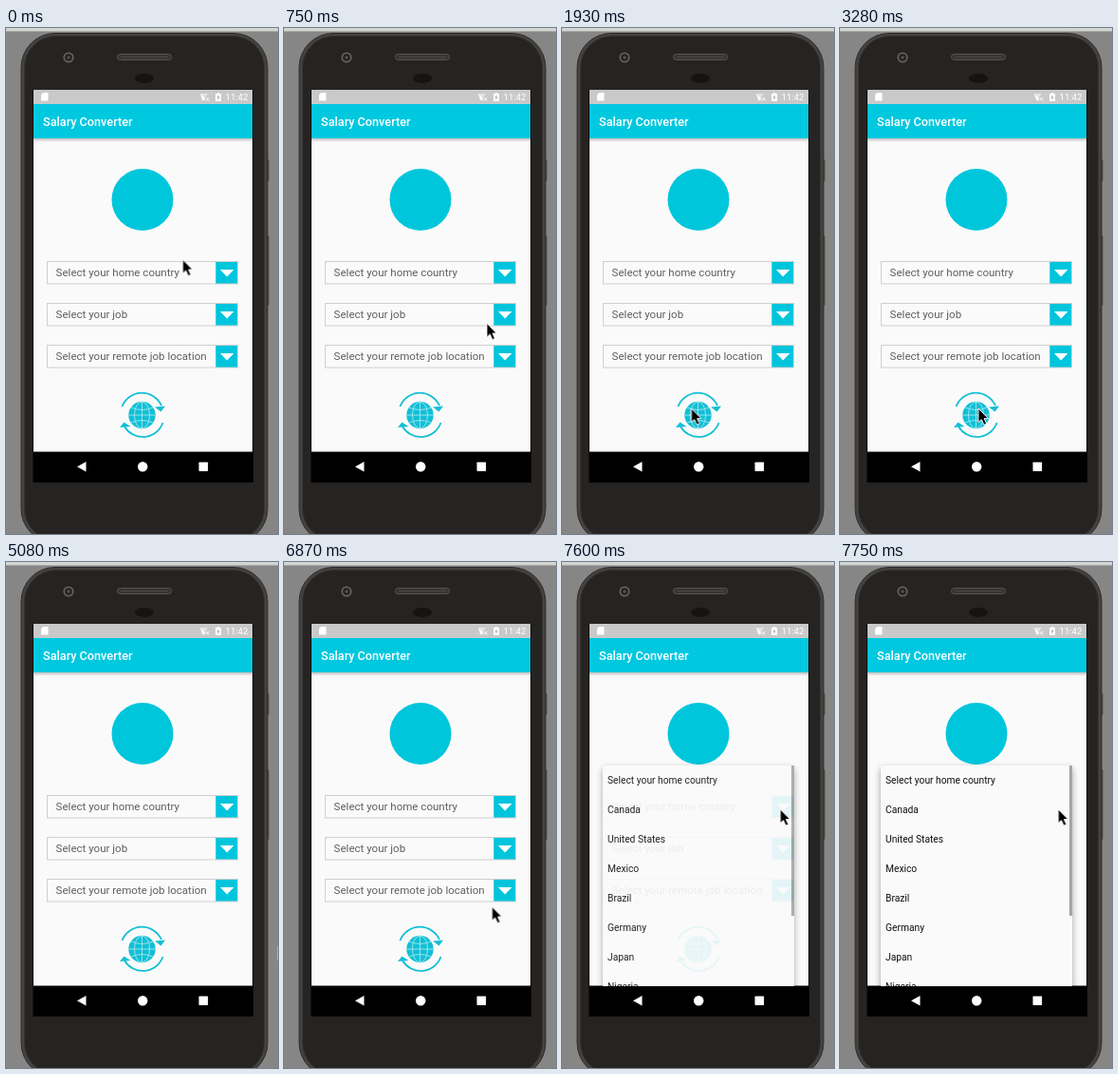
These frames come from a looping animation (287 by 532 pixels, 8000 ms). An HTML page:

```html
<!DOCTYPE html>
<html lang="en">
<head>
<meta charset="utf-8">
<title>Salary Converter</title>
<style>
  html, body { margin: 0; width: 100%; height: 100%; overflow: hidden; background: #868686; }
  svg { position: absolute; left: 0; top: 0; display: block; }
  text, .popup { font-family: Roboto, sans-serif; }
  .hint { font-size: 11.55px; fill: #606060; }
  .screen { position: absolute; left: 29px; top: 66px; width: 231px; height: 379.5px; overflow: hidden; }
  .popup {
    position: absolute; left: 14px; width: 201.5px; top: 148px; height: 250px;
    overflow: hidden; background: #fafafa; opacity: 0;
    box-shadow: 0 3px 7px rgba(0, 0, 0, .36);
    font-size: 10.28px; color: #111;
  }
  .item { height: 31px; line-height: 31.5px; padding-left: 5px; white-space: nowrap; }
  .bar { position: absolute; right: 0; top: 0; width: 2.5px; height: 158px; background: #a6a6a6; }
</style>
</head>
<body>
<svg width="287" height="532" viewBox="0 0 287 532">
  <defs>
    <linearGradient id="drop" x2="0" y2="1">
      <stop stop-color="#000" stop-opacity=".24"/>
      <stop offset="1" stop-color="#000" stop-opacity="0"/>
    </linearGradient>
  </defs>
  <rect width="287" height="3.5" fill="#d2d5d2"/>

  <!-- phone body -->
  <g>
    <rect x="273" y="138" width="4.5" height="23" rx="1.5" fill="#4b4a48"/>
    <rect x="273" y="218" width="4.5" height="74" rx="1.5" fill="#4b4a48"/>
    <rect x="16" y="5.5" width="260" height="536" rx="36" fill="#45423f" stroke="#2e2c2a"/>
    <rect x="19.5" y="8.5" width="253" height="530" rx="33" fill="#262422" stroke="#35322f"/>
    <circle cx="66" cy="31" r="4.7" fill="#22201f" stroke="#64615e" stroke-width="1.8"/>
    <circle cx="66" cy="31" r="1.7" fill="#55524f"/>
    <rect x="117.5" y="27.5" width="57" height="6" rx="3" fill="#35322f" stroke="#595652"/>
    <path d="M121 30.5H171" stroke="#474440" stroke-width="2"/>
    <ellipse cx="146" cy="53" rx="10" ry="5" fill="#151413"/>
    <rect x="28" y="65" width="233" height="413" fill="#111"/>
  </g>

  <!-- app screen -->
  <rect x="29" y="65" width="231" height="381" fill="#fafafa"/>
  <rect x="29" y="65" width="231" height="15" fill="#c9c9c9"/>
  <g fill="#fff">
    <path d="M39 68H44.5V76.5H37V70.3Z"/>
    <path d="M205 69H213L207 77Z" fill-opacity=".5"/>
    <path d="M205 69L210.5 75L208 76.5Z"/>
    <path d="M210.8 73L214.3 76.5M214.3 73L210.8 76.5" stroke="#fff"/>
    <path d="M221 69H223V68H225V69H227V77H221Z"/>
    <path d="M224.6 70L222.4 73.6H223.8L223.4 76L225.6 72.6H224.2Z" fill="#aaa"/>
    <text x="231.5" y="76" font-size="9.6">11:42</text>
  </g>
  <rect x="29" y="116" width="231" height="4" fill="url(#drop)"/>
  <rect x="29" y="80" width="231" height="36" fill="#00c8df"/>
  <text x="39" y="103" font-size="12.7" font-weight="500" fill="#fff">Salary Converter</text>
  <circle cx="144" cy="180.5" r="32.5" fill="#00c6dc"/>
  <g id="fields"></g>

  <!-- convert button -->
  <g fill="none" stroke="#12bfd5" stroke-width="1.8">
    <path d="M122.5 398A22.5 22.5 0 0 1 164 397M165.5 415A22.5 22.5 0 0 1 125 419"/>
    <path d="M157 398.5L168 397.5L163.5 403.5ZM120 420L124.5 414.5L131.5 419Z" fill="#12bfd5" stroke="none"/>
    <circle cx="143.5" cy="407" r="14.2" fill="#12bfd5" stroke="none"/>
    <g stroke="#b5ecf3" stroke-width=".8">
      <ellipse cx="143.5" cy="407" rx="8" ry="14"/>
      <path d="M143.5 393V421M129.5 407H157.5M132 399Q143.5 404 155 399M132 415Q143.5 410 155 415"/>
    </g>
  </g>

  <!-- navigation bar -->
  <rect x="29" y="445.5" width="232" height="32" fill="#000"/>
  <g fill="#fff">
    <path d="M75 461.3L84.5 456V466.6Z"/>
    <circle cx="144.2" cy="461.3" r="5.2"/>
    <rect x="203.5" y="456.5" width="9.6" height="9.6" rx=".8"/>
  </g>
</svg>

<div class="screen"><div class="popup" id="popup"><div id="list"></div><div class="bar"></div></div></div>

<svg width="287" height="532" viewBox="0 0 287 532">
  <path id="cursor" d="M0 0V14.6L3.3 11.6L5.9 17.2L8.6 16L6.1 10.6H10.4Z" fill="#000" stroke="#fff" stroke-width=".9"/>
</svg>

<script>
  const LOOP = 8000;
  const $ = id => document.getElementById(id);

  const field = (label, y) => `
    <rect x="221.3" y="${y}" width="23.7" height="24" fill="#00c5dc"/>
    <rect x="43.5" y="${y + .5}" width="201" height="23.5" fill="none" stroke="#cfcfcf"/>
    <path d="M226 ${y + 9}H240.5L233.2 ${y + 16.5}Z" fill="#fff"/>
    <text class="hint" x="52.6" y="${y + 16}">${label}</text>`;

  $('fields').innerHTML = ['Select your home country', 'Select your job', 'Select your remote job location']
    .map((label, i) => field(label, 245 + 44 * i)).join('');

  $('list').innerHTML = ['Select your home country', 'Canada', 'United States', 'Mexico',
    'Brazil', 'Germany', 'Japan', 'Nigeria'].map(s => `<div class="item">${s}</div>`).join('');

  // Each step holds until the next one: [time, properties]
  const play = (el, steps) => {
    const frames = steps.map(([t, props]) => ({ offset: t / LOOP, easing: 'step-end', ...props }));
    frames.push({ ...frames[frames.length - 1], offset: 1 });
    el.animate(frames, { duration: LOOP, iterations: Infinity }).startTime = 0;
  };

  const path = [
    [0, 186.5, 243.5], [150, 208, 256.5], [300, 209.5, 258.5], [450, 209, 258.5],
    [600, 213, 274.5], [750, 214, 310.5], [900, 211, 312.5], [1050, 155, 391.5],
    [1190, 146, 397.5], [1340, 130.5, 400.5], [1780, 136, 399.5], [1930, 136.5, 400],
    [3280, 146, 400], [5080, 287.2, 404], [5230, 300, 404], [5980, 257, 391],
    [6120, 215, 384.5], [6870, 219.5, 362.5], [7010, 230.3, 260]
  ];
  play($('cursor'), path.map(([t, x, y]) => [t, { transform: `translate(${x}px, ${y}px)` }]));

  const slit = { top: '175px', height: '51px', backgroundColor: '#e6e6e6' };
  const full = { top: '148px', height: '250px', backgroundColor: '#fafafa' };
  play($('popup'), [
    [0, { opacity: 0, ...slit }],
    [7460, { opacity: .57, ...slit }],
    [7600, { opacity: .92, ...full }],
    [7750, { opacity: 1, ...full }]
  ]);
  play($('list'), [
    [0, { transform: 'translateY(-89px)' }],
    [7600, { transform: 'translateY(0px)' }]
  ]);
</script>
</body>
</html>
```
